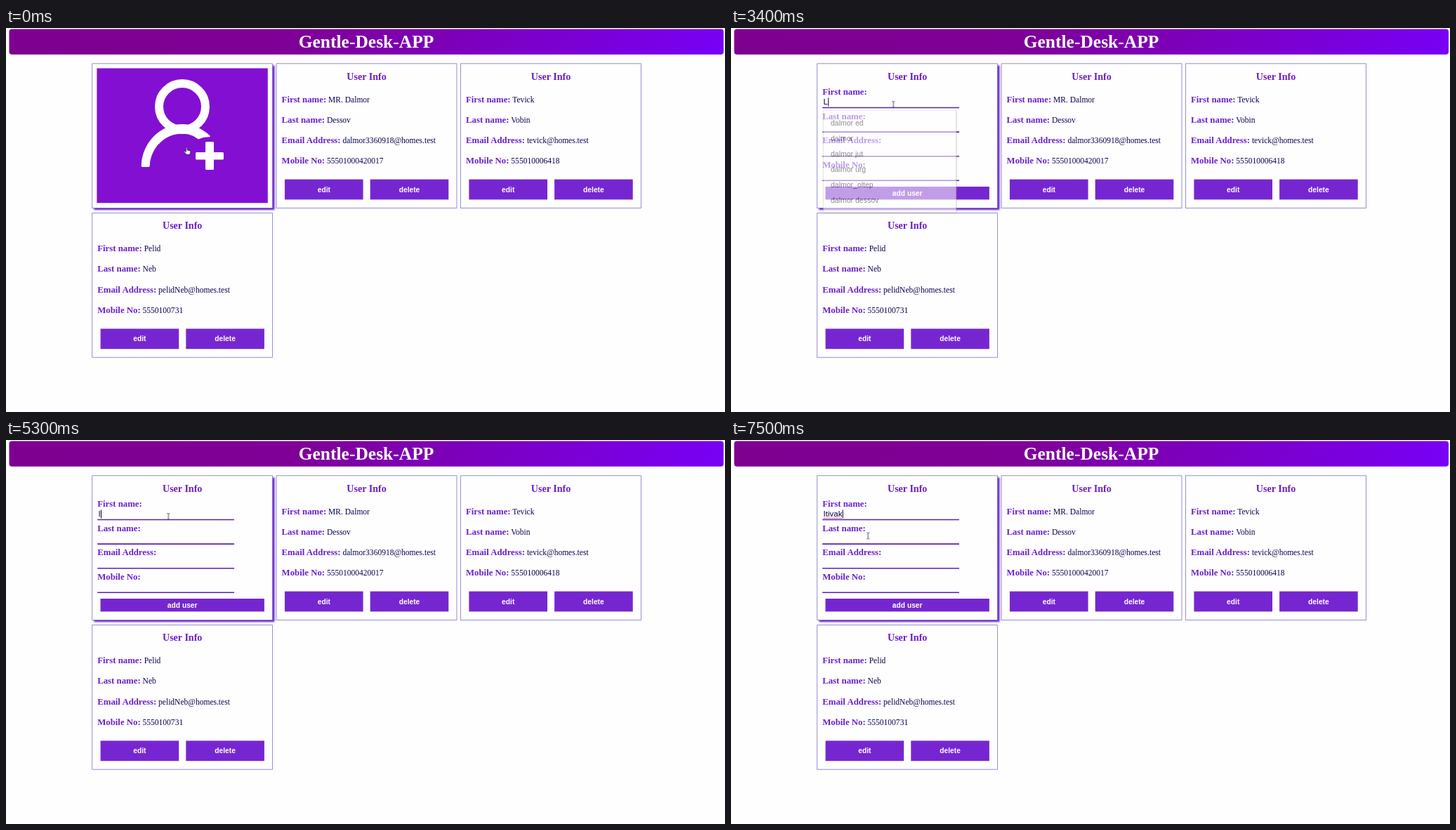
Recreate the animation shown at these times as an HTML page. Size 1024 by 547 pixels, loop 8 s.

```html
<!DOCTYPE html>
<html lang="en">
<head>
<meta charset="utf-8">
<title>Gentle-Desk-APP</title>
<style>
  html, body { margin: 0; width: 100%; height: 100%; overflow: hidden; background: #fefefe; }
  svg { display: block; width: 1024px; height: 547px; }
  text { font-family: "Liberation Serif", "Times New Roman", serif; white-space: pre; }
  .mid { text-anchor: middle; }
  .banner { font-size: 25.5px; font-weight: bold; fill: #fff; }
  .title { font-size: 14.08px; font-weight: bold; fill: #6d1bc9; }
  .label { font-size: 12.8px; font-weight: bold; fill: #6a20ca; }
  .value { font-size: 11.52px; font-weight: normal; fill: #0a0150; }
  .card { fill: #fefefe; stroke: #7d74c0; stroke-width: .8; }
  .btn { fill: #7626d0; }
  .btn-text, #typed, .menu text { font-family: "Liberation Sans", Arial, sans-serif; }
  .btn-text { font-size: 10.24px; font-weight: bold; fill: #fff; }
  .line { stroke: #5a1fb4; stroke-width: 1.6; }
  #typed { font-size: 11.52px; fill: #0a0140; }
  #caret { fill: #0a0130; }
  .menu text { font-size: 10.5px; fill: #333; }

  .tile, .hand, .form, .beam, .menu, .squiggle { animation: 8s step-end infinite; }
  .tile, .hand { animation-name: leave; }
  .form { animation-name: enter; }
  .beam { animation-name: enter, travel; }
  .menu { animation-name: menu; }
  .squiggle { animation-name: squiggle; }
  @keyframes leave { 0% { opacity: 1; } 18.75%, 100% { opacity: 0; } }
  @keyframes enter { 0% { opacity: 0; } 18.75%, 100% { opacity: 1; } }
  @keyframes menu {
    0% { opacity: 0; }
    32.5% { opacity: 1; }
    42.5% { opacity: .55; }
    43.75% { opacity: .09; }
    45%, 100% { opacity: 0; }
  }
  @keyframes squiggle { 0% { opacity: 0; } 88.75%, 100% { opacity: 1; } }
  @keyframes travel {
    0% { transform: translate(256.5px, 171.3px); }
    22.5% { transform: translate(257px, 179px); }
    26.25% { transform: translate(248px, 159px); }
    28.75% { transform: translate(241px, 138px); }
    30% { transform: translate(233px, 116px); }
    31.25% { transform: translate(231.3px, 109px); }
    86.25% { transform: translate(229px, 119px); }
    87.5% { transform: translate(222px, 154px); }
    88.75% { transform: translate(214px, 190px); }
    90% { transform: translate(208px, 203px); }
    91.25% { transform: translate(202px, 182px); }
    92.5% { transform: translate(197px, 152px); }
    93.75%, 100% { transform: translate(195.3px, 136.5px); }
  }
</style>
</head>
<body>
<svg viewBox="0 0 1024 547">
  <defs>
    <linearGradient id="bar" gradientUnits="userSpaceOnUse" x1="250" y1="-240" x2="770" y2="280">
      <stop offset="0" stop-color="#7d0090"/>
      <stop offset=".4" stop-color="#7f0096"/>
      <stop offset="1" stop-color="#7800f6"/>
    </linearGradient>
    <filter id="soft" x="-5%" y="-5%" width="110%" height="110%"><feGaussianBlur stdDeviation="1"/></filter>
  </defs>

  <rect x="4.5" y="1.6" width="1017.5" height="36.2" rx="4" fill="url(#bar)"/>
  <text class="banner mid" x="513" y="28">Gentle-Desk-APP</text>

  <rect x="125.4" y="53.4" width="257" height="205.6" fill="#6414cc" filter="url(#soft)"/>
  <rect class="card" x="122.7" y="50.8" width="256.9" height="205.6"/>

  <g class="tile">
    <rect x="129.4" y="57.4" width="243.4" height="191.8" fill="#830fd2"/>
    <circle cx="251" cy="112" r="33" fill="none" stroke="#fff" stroke-width="12"/>
    <path fill="#fff" d="M194 198 Q192.500 198 192.700 195.500 C194 163 220 137 251 137
      C266 137 281 144 290.500 153.500 Q291.500 155 289.500 155.200 Q281 155 274 158.600
      C267 153 259 150.500 251 150.500 C226 150.500 206 171 204.800 196 Q204.700 198 203 198Z"/>
    <path fill="#fff" d="M284 163.500 q0 -1.500 1.500 -1.500 h9 q1.500 0 1.500 1.500 v13.500 h12.500 q1.500 0 1.500 1.500
      v7.500 q0 1.500 -1.500 1.500 h-12.500 v13 q0 1.500 -1.500 1.500 h-9 q-1.500 0 -1.500 -1.500 v-13 h-12.500
      q-1.500 0 -1.500 -1.500 v-7.500 q0 -1.500 1.500 -1.500 h12.500Z"/>
  </g>

  <g class="form" id="form">
    <text class="title mid" x="251.200" y="73.500">User Info</text>
    <rect class="btn" x="134.500" y="226" width="233.400" height="18.400"/>
    <text class="btn-text mid" x="251.200" y="238.900">add user</text>
  </g>

  <g id="cards"></g>

  <path class="squiggle" d="M132 111.300H157.500" stroke="#d0263c" stroke-width="1" stroke-dasharray="1.600 .8"/>
  <text id="typed" x="131.600" y="109"></text>
  <rect id="caret" y="99.500" width="1" height="12"/>

  <g class="menu" id="menu">
    <rect x="132" y="118" width="189" height="146" rx="2" fill="#888" filter="url(#soft)"/>
    <rect x="131.500" y="117" width="189" height="146" rx="2" fill="#fff" stroke="#ccc" stroke-width=".8"/>
  </g>

  <path class="hand" transform="translate(257.800 175)" fill="#fff" stroke="#1a0a2a" stroke-width=".8"
    d="M-1.600 -4.500 q.9 -1.200 1.800 0 v3.300 l3.800 .9 q1.200 .4 1 1.800 l-.7 3.800 h-5 l-3.600 -4 q-.5 -1.300 .9 -1 l1.800 1.100Z"/>
  <path class="beam" fill="none" stroke="#4a4a52" stroke-width="1"
    d="M-2 -4.400 Q0 -4.400 0 -3.400 Q0 -4.400 2 -4.400 M0 -3.400 V3.400 M-2 4.400 Q0 4.400 0 3.400 Q0 4.400 2 4.400"/>
</svg>
<script>
  const LABELS = ["First name:", "Last name:", "Email Address:", "Mobile No:"];
  const USERS = [
    { x: 262.4, y: 0, info: ["MR. Dalmor", "Dessov", "dalmor3360918@homes.test", "55501000420017"] },
    { x: 524.8, y: 0, info: ["Tevick", "Vobin", "tevick@homes.test", "555010006418"] },
    { x: 0, y: 212.8, info: ["Pelid", "Neb", "pelidNeb@homes.test", "5550100731"] }
  ];
  const MENU = ["dalmor ed", "dalmor", "dalmor jut", "dalmor urg", "dalmor_oltep", "dalmor dessov"];
  // [time, text in the field, caret shown]
  const TYPING = [
    [0, "", 0], [2600, "", 1], [3400, "L", 1], [3800, "Li", 1], [4400, "Li", 0],
    [4800, "Li", 1], [4900, "L", 1], [5000, "", 1], [5300, "I", 1], [5600, "It", 1],
    [5700, "Iti", 1], [5900, "Itiv", 1], [6000, "Itiva", 1], [6100, "Itivak", 1],
    [6700, "Itivak", 0], [7100, "Itivak", 1]
  ];
  const LOOP = 8000;
  const $ = id => document.getElementById(id);
  const add = (id, markup) => $(id).insertAdjacentHTML("beforeend", markup);

  const button = (x, name) => `
    <rect class="btn" x="${x}" y="215.600" width="111.600" height="28.800"/>
    <text class="btn-text mid" x="${x + 55.8}" y="233.500">${name}</text>`;

  const card = ({ x, y, info }) => `<g transform="translate(${x} ${y})">
    <rect class="card" x="122.700" y="50.800" width="256.900" height="205.600"/>
    <text class="title mid" x="251.200" y="73.500">User Info</text>
    ${info.map((v, i) => `<text class="label" x="130.200" y="${105.5 + i * 29.2}">${LABELS[i]}<tspan class="value"> ${v}</tspan></text>`).join("")}
    ${button(134.6, "edit")}${button(256.3, "delete")}</g>`;

  add("cards", USERS.map(card).join(""));
  add("form", LABELS.map((l, i) => {
    const y = 95 + i * 34.6;
    return `<text class="label" x="130.200" y="${y}">${l}</text><path class="line" d="M130.200 ${y + 18.5}H325"/>`;
  }).join(""));
  add("menu", MENU.map((m, i) => `<text x="142" y="${138.6 + i * 22}">${m}</text>`).join(""));

  const typed = $("typed"), caret = $("caret");
  let start;
  function draw(now) {
    start ??= now;
    const t = (now - start) % LOOP;
    const [, text, on] = TYPING.findLast(s => s[0] <= t);
    if (typed.textContent !== text) typed.textContent = text;
    caret.setAttribute("x", 131.8 + (text ? typed.getComputedTextLength() : 0));
    caret.setAttribute("opacity", on);
    requestAnimationFrame(draw);
  }
  requestAnimationFrame(draw);
</script>
</body>
</html>
```
